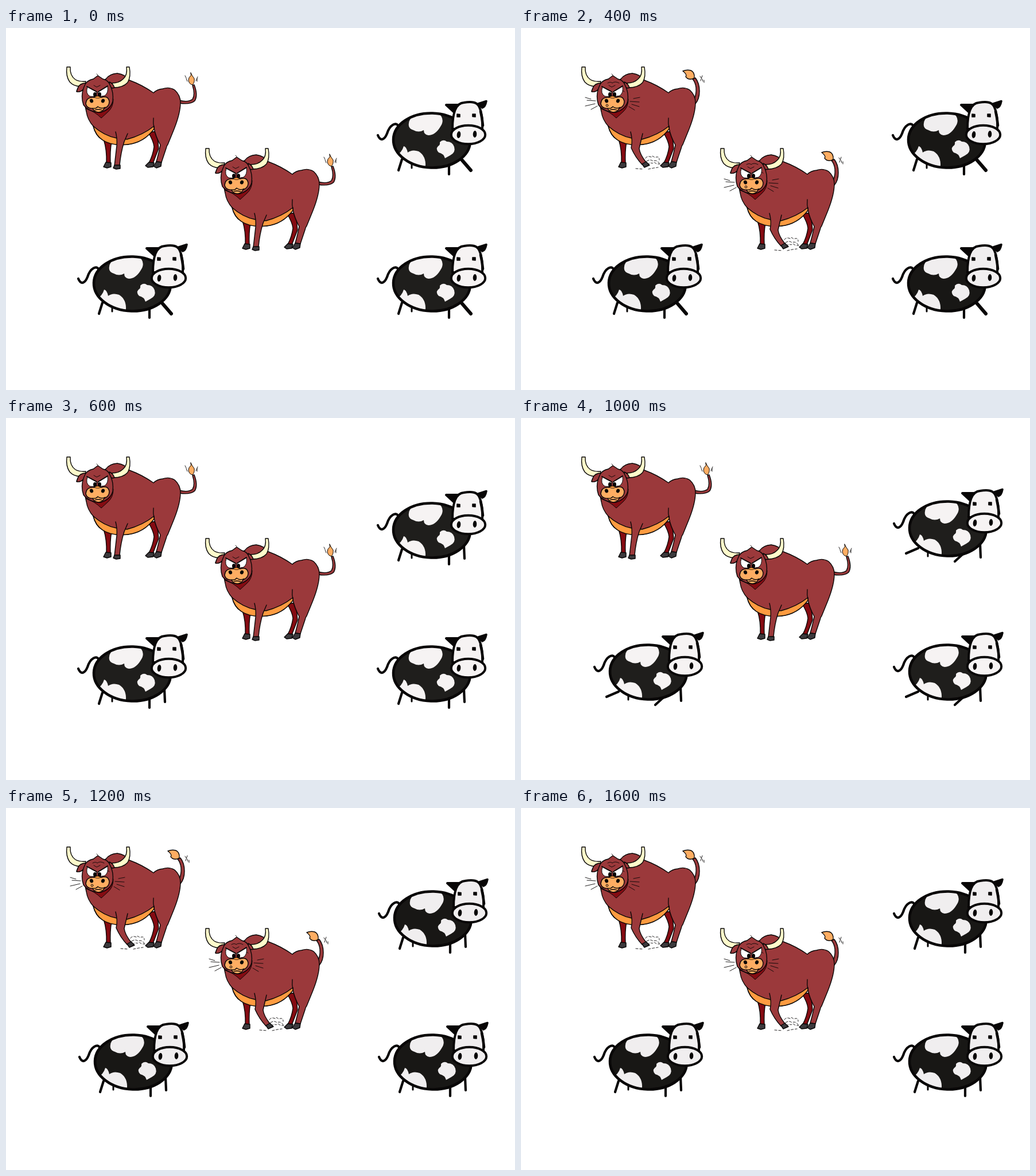
Write an HTML page with a canvas that moves like this. It is 887 px wide and 631 px high and loops after 1800 ms.

```html
<!DOCTYPE html>
<html lang="en">
<head>
<meta charset="utf-8">
<title>Bulls and cows</title>
<style>
html, body { margin: 0; width: 100%; height: 100%; overflow: hidden; background: #fff; }
canvas { display: block; }
</style>
</head>
<body>
<canvas id="stage" width="887" height="631"></canvas>
<script>
const ctx = document.getElementById('stage').getContext('2d');
const STEP = 200;
const INK = '#080606', FUR = '#9b393b', DARK = '#850b12', PEACH = '#ffad62',
  ORANGE = '#ff9b40', CREAM = '#fffbcb', HOOF = '#3c3a3d';

function shape(d, fill, width = 1.4, ink = INK) {
  const path = new Path2D(d);
  if (fill) { ctx.fillStyle = fill; ctx.fill(path); }
  if (width) { ctx.strokeStyle = ink; ctx.lineWidth = width; ctx.stroke(path); }
}
const line = (d, width = 1.3) => shape(d, null, width);

function oval(x, y, rx, ry, fill, width = 0, turn = 0) {
  const path = new Path2D();
  path.ellipse(x, y, rx, ry, turn, 0, Math.PI * 2);
  shape(path, fill, width);
  return path;
}

function at(x, y, draw) {
  ctx.save();
  ctx.translate(x, y);
  draw();
  ctx.restore();
}

function bullTail(raised) {
  if (raised) {
    shape('M301 132V126Q306 116 305 104Q304 95 299 89L304 87Q311 96 311 110Q311 124 304 132Z', FUR);
    shape('M282 75Q289 72 296 74Q303 77 302 87Q297 91 290 88L287 85Q290 81 282 75Z', PEACH);
    line('M312 84L314 87M316 83L313 92M316 89L317 93M319 91V95', .9);
  } else {
    shape('M302 126Q318 130 325 124Q330 116 325 100L328 99Q335 117 329 127Q321 134 302 131Z', FUR);
    shape('M322 78Q324 83 328 88Q329 95 325 99Q319 98 318 91Q318 86 322 83Z', PEACH, 1);
    line('M312 83L314 87M314 88L316 93M331 92L334 85M333 88V93', .9);
  }
}

function bullBody() {
  // far legs
  shape('M170 194Q176 212 175 236H182Q181 214 184 198Z', DARK);
  shape('M174 234L170 242L176 244L183 242V235Z', HOOF);
  shape('M248 182Q257 197 258 207Q256 222 249 235L256 236L266 210L263 180Z', DARK);
  shape('M249 234L243 240L247 243L256 242L258 235Z', HOOF);
  // hump, trunk and near hind leg
  shape('M174 89Q180 80 194 79Q208 81 215 91Q237 99 257 113Q263 107 273 106Q284 102 294 108' +
    'Q304 117 304 130Q304 148 293 176L282 203Q280 205 279 210L271 234L262 233Q266 219 269 204' +
    'Q261 190 258 175Q240 198 212 203Q182 205 168 195Q156 188 152 171Q142 160 140 146L136 127L160 95Z', FUR);
  shape('M262 233L257 241L262 244L270 241L271 234Z', HOOF);
  shape('M152 171Q171 188 193 192L211 194Q238 187 258 171V176Q240 200 212 203Q184 206 168 195Q156 187 152 171Z', ORANGE);
  line('M258 174Q256 166 257 157');
}

function frontLeg(pawing) {
  if (pawing) {
    shape('M191 181Q195 196 192 209Q199 225 211 238L218 234Q207 220 206 210L212 184', FUR);
    shape('M211 237L218 233L224 239L215 243Z', HOOF);
  } else {
    shape('M191 181Q194 192 193 205L189 240L198 239Q200 217 206 198L212 184', FUR);
    shape('M189 239L187 244L192 246L199 245V239Z', HOOF);
  }
}

function bullHead(angry) {
  shape('M140 141Q154 145 166 157L178 146Q187 138 187 124Z', DARK, 1);
  shape('M112 68Q111 83 121 90Q128 94 139 93L137 101Q120 104 111 94Q104 84 106 68Z', CREAM);
  shape('M210 68Q212 82 204 89Q197 96 185 96L187 104Q204 104 212 95Q218 85 215 68Z', CREAM);
  line('M142 97Q130 96 126 103L123 110Q130 113 137 105', 1.4);
  shape('M140 96Q128 96 125 105L123 111Q131 113 138 103Z', FUR);
  shape('M180 94Q187 97 189 104Q184 106 180 102Z', FUR);
  shape('M138 98Q142 91 152 89L160 83L169 89Q178 91 181 99Q188 112 186 128' +
    'Q182 142 165 147Q145 147 135 134Q130 119 135 105Z', FUR);
  line('M153 100L158 103L164 100M158 80L160 82', .9);
  if (angry) line('M151 96Q156 93 159 96Q164 92 171 96M176 108L180 111', .9);
  // eyes and brows
  shape('M142 103Q138 114 146 119L157 120L158 112Z', '#fff', 1);
  shape('M177 102Q179 113 172 118L161 120L160 112Z', '#fff', 1);
  line('M141 102L158 111M177 101L161 111', 1.8);
  oval(155, 116, 3, 4, INK);
  oval(163, 116, 3, 4, INK);
  // muzzle
  shape('M153 121Q159 116 166 121Q178 117 180 128Q180 137 171 140Q169 146 161 147' +
    'Q153 146 151 140Q141 141 139 132Q140 120 153 121Z', PEACH);
  shape('M154 121Q159 116 165 121Q160 124 154 121Z', ORANGE, .8);
  oval(149, 127, 3, 3.6, INK, 0, -.4);
  oval(169, 127, 3, 3.6, INK, 0, .4);
  line('M152 140Q157 141 160 137Q166 142 173 138M155 143Q160 141 167 143', 1.3);
}

function snort() {
  line('M112 121L122 124M115 126L130 127M112 136L129 132M122 142L133 136' +
    'M196 123L207 121M190 128L206 129M193 133L206 137M188 137L198 143', .9);
  oval(150, 135, 1.8, 2, PEACH, 1);
  ctx.setLineDash([4, 3]);
  line('M217 227Q220 222 227 225Q229 221 233 226Q241 222 241 230' +
    'M219 232Q226 228 230 232Q237 229 241 236M222 239Q222 233 229 236Q232 232 236 237H242' +
    'M200 245L213 246M222 246Q230 244 239 243', .9);
  ctx.setLineDash([]);
}

function bull(angry) {
  bullTail(angry);
  bullBody();
  frontLeg(angry);
  bullHead(angry);
  if (angry) snort();
}

const LEGS = {
  kick: 'M690 229L684 248M772 232V255',
  stand: 'M690 229L684 248M772 232V255M798 222L799 245',
  run: 'M690 230L669 239M776 233L754 253M798 222L799 246'
};

function cowBody(black, white) {
  const trunk = oval(742, 196, 67, 47.5, black, 0, .03);
  const spot = d => shape(d, white, 0);
  ctx.save();
  ctx.clip(trunk);
  spot('M702 171Q700 159 712 153Q724 149 735 151Q751 147 758 153Q764 162 757 172Q748 187 736 187' +
    'Q728 186 728 178Q719 183 710 178Q703 176 702 171Z');
  spot('M756 199Q762 193 768 198Q778 198 781 207Q784 217 774 222L765 227Q763 219 754 217Q748 211 753 206Q757 204 756 199Z');
  spot('M693 206Q698 207 700 217Q708 211 719 215Q732 223 731 241L700 244L680 222Q690 217 693 206Z');
  ctx.restore();
  shape(trunk, null, 4.6);
}

function cowHead(white) {
  shape('M767 134L787 134L780 146Z', black = INK, 4);
  shape('M837 127.5Q835 138 830 139L823 132Z', INK, 3.6);
  shape('M778 176C778 152 782 131 798 130C820 126 825 133 828 148Q831 160 830 176Z', white, 4);
  line('M827 145Q830 158 831 170', 4.6);
  shape('M786 150L791 150.5V155H786ZM813 150H818V155L813 154.5Z', INK, 1.6);
  oval(805.5, 186, 29.7, 16.3, white, 4);
  oval(789, 186, 3.3, 6, INK, 0, .12);
  oval(817, 185, 3.3, 6, INK, 0, .05);
}

function cow(pose, black, white) {
  line(LEGS[pose], 4.2);
  line('M707 238V244', 3);
  if (pose === 'kick') line('M791 226L810 248', 6);
  line('M648 187C653 199 660 194 664 184C669 168 680 164 683 170Q684 173 682 178', 4.2);
  cowBody(black, white);
  cowHead(white);
}

// One entry per step: bull mood, cow pose, cow offset.
const STEPS = [
  [false, 'kick', 0, 0], [false, 'stand', 0, 0], [true, 'kick', 0, 0],
  [false, 'stand', 0, 0], [true, 'stand', 2, -9], [false, 'run', 2, -3],
  [true, 'stand', 2, -3], [false, 'run', 2, -3], [true, 'stand', 2, -3]
];
const BULLS = [[0, 0], [242, 142]];
const COWS = [[0, 0], [0, 250], [-522, 250]];

function render(now) {
  const [angry, pose, dx, dy] = STEPS[Math.floor(now / STEP) % STEPS.length];
  const black = angry ? '#181715' : '#1f1e1c';
  const white = angry ? '#f0eeef' : '#f6f3f3';
  ctx.fillStyle = '#fff';
  ctx.fillRect(0, 0, 887, 631);
  ctx.lineCap = ctx.lineJoin = 'round';
  for (const [x, y] of BULLS) at(x, y, () => bull(angry));
  for (const [x, y] of COWS) at(x + dx, y + dy, () => cow(pose, black, white));
}

const start = performance.now();
function tick() {
  render(performance.now() - start);
  requestAnimationFrame(tick);
}
tick();
</script>
</body>
</html>
```
